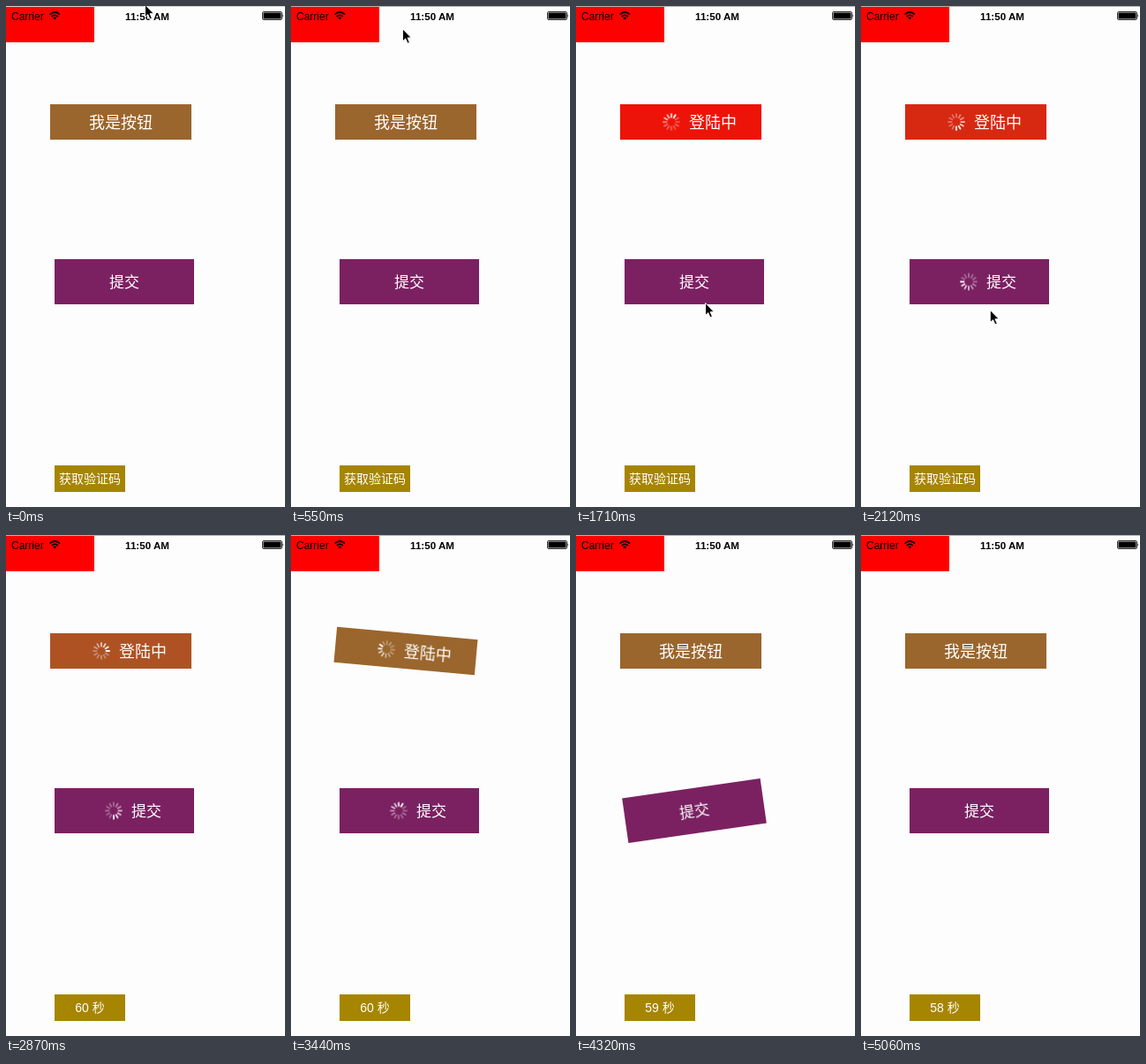
These frames come from a looping animation (316x566 px, 5.34 s). An HTML page:

```html
<!DOCTYPE html>
<html lang="zh-CN">
<head>
<meta charset="utf-8">
<title>按钮动画</title>
<style>
  html, body { margin: 0; width: 316px; height: 566px; overflow: hidden; background: #fdfdfd; }
  svg { display: block; }
  text { font-family: "Liberation Sans", "Noto Sans CJK SC", "Noto Sans CJK", sans-serif; font-weight: 300; }
  .label { fill: #fff; }
  .mid { text-anchor: middle; }

  /* Every animation shares the 5340 ms loop; negative delays shift the start. */
  .anim { animation: 5340ms linear infinite; }

  .edge { animation-name: edge; animation-timing-function: step-end; }
  @keyframes edge { 0% { fill: #d2d2d2; } .93%, 100% { fill: #b2b2b2; } }

  .login { transform-origin: 130px 131px; --load: -3970ms; --shake: -1999ms; }
  .submit { transform-origin: 134px 311.5px; --load: -3550ms; --shake: -1510ms; }

  .shake { animation-name: shake; animation-delay: var(--shake); }
  @keyframes shake {
    0%, 3.09%, 6.18%, 9.27%, 12.36%, 15.44% { transform: rotate(-9deg); }
    1.545%, 4.635%, 7.725%, 10.815%, 13.905% { transform: rotate(9deg); }
    15.45%, 100% { transform: rotate(0deg); }
  }

  .busy, .idle { animation-delay: var(--load); animation-timing-function: step-end; }
  .busy { animation-name: busy; }
  .idle { animation-name: idle; }
  @keyframes busy { 0% { visibility: visible; } 43.26%, 100% { visibility: hidden; } }
  @keyframes idle { 0% { visibility: hidden; } 43.26%, 100% { visibility: visible; } }

  .face { transform-origin: 130px 131px; animation-name: flash, pulse; animation-duration: 5340ms; }
  @keyframes flash {
    0%, 22.45% { fill: #9a662d; }
    22.46%, 25.66% { fill: #f00; }
    60.77%, 100% { fill: #9a662d; }
  }
  @keyframes pulse {
    0%, 24.16% { transform: scale(1, 1); }
    27.15% { transform: scale(1.1, 1.2); }
    29.96%, 100% { transform: scale(1, 1); }
  }

  .spin { animation-name: spin; animation-timing-function: steps(64); }
  @keyframes spin { to { transform: rotate(1920deg); } }

  .code { animation-timing-function: step-end; }
  .ask { animation-name: ask; }
  .s60 { animation-name: s60; }
  .s59 { animation-name: s59; }
  .s58 { animation-name: s58; }
  @keyframes ask { 0% { visibility: visible; } 47.75%, 100% { visibility: hidden; } }
  @keyframes s60 { 0% { visibility: hidden; } 47.75% { visibility: visible; } 73.5%, 100% { visibility: hidden; } }
  @keyframes s59 { 0% { visibility: hidden; } 73.5% { visibility: visible; } 94.75%, 100% { visibility: hidden; } }
  @keyframes s58 { 0% { visibility: hidden; } 94.75%, 100% { visibility: visible; } }

  .pointer { animation-name: travel; }
  @keyframes travel {
    0%, .94% { transform: translate(157px, -2px); }
    10.3% { transform: translate(126px, 25px); }
    15.92%, 24.16% { transform: translate(126px, 127px); }
    32.02%, 34.64% { transform: translate(146px, 335px); }
    39.7% { transform: translate(146px, 342px); }
    42.88% { transform: translate(105px, 507px); }
    45.32%, 48.3% { transform: translate(100px, 533px); }
    51.5%, 100% { transform: translate(207px, 538px); }
  }
  .arrow { animation-name: leave; animation-timing-function: step-end; }
  @keyframes leave { 0% { visibility: visible; } 52.8%, 100% { visibility: hidden; } }
  .touch { animation-name: touch; animation-timing-function: step-end; }
  @keyframes touch {
    0%, 24.16%, 33.7%, 47.4%, 100% { visibility: hidden; }
    22.46%, 32.6%, 45.7% { visibility: visible; }
  }
</style>
</head>
<body>
<svg width="316" height="566" viewBox="0 0 316 566">
  <rect class="anim edge" width="316" height="1"/>
  <rect y="1" width="100" height="40" fill="#f00"/>

  <g id="status">
    <text x="6" y="16" font-size="12">Carrier</text>
    <g fill="none" stroke="#000" stroke-width="1.7">
      <path d="M49.6 9.6Q55.3 4.4 61 9.6"/>
      <path d="M51.8 12Q55.3 8.9 58.8 12"/>
    </g>
    <path d="M53.3 13.3Q55.3 11.8 57.3 13.3L55.3 15.6Z"/>
    <text class="mid" x="160" y="16" font-size="11.6" style="font-weight:700">11:50 AM</text>
    <rect x="290.5" y="6.5" width="22" height="9" rx="1.5" fill="none" stroke="#000" stroke-width=".8"/>
    <rect x="291.5" y="7.5" width="20" height="7" rx=".6"/>
    <path d="M313.5 9.3Q315.2 11 313.5 12.7Z"/>
  </g>

  <g class="login anim shake">
    <rect class="anim face" x="50" y="111" width="160" height="40"/>
    <text class="label mid anim idle" x="130" y="137.5" font-size="18">我是按钮</text>
    <g class="anim busy">
      <g transform="translate(108 131) rotate(150)"><g class="anim spin"></g></g>
      <text class="label" x="128" y="137.5" font-size="18">登陆中</text>
    </g>
  </g>

  <g class="submit anim shake">
    <rect x="55" y="286" width="158" height="51" fill="#7b2162"/>
    <text class="label mid anim idle" x="134" y="317.7" font-size="17">提交</text>
    <g class="anim busy">
      <g transform="translate(122 311.5) rotate(240)"><g class="anim spin"></g></g>
      <text class="label" x="142" y="317.7" font-size="17">提交</text>
    </g>
  </g>

  <g class="label mid" font-size="14">
    <rect x="55" y="519" width="80" height="30" fill="#a68500"/>
    <text class="anim code ask" x="95" y="539">获取验证码</text>
    <text class="anim code s60" x="95" y="539">60 秒</text>
    <text class="anim code s59" x="95" y="539">59 秒</text>
    <text class="anim code s58" x="95" y="539">58 秒</text>
  </g>

  <g class="anim pointer">
    <g class="anim touch" fill="none">
      <circle cx="2.5" cy="1" r="9.5" stroke="#555" stroke-opacity=".5" stroke-width="2"/>
      <circle cx="2.5" cy="1" r="9.5" stroke="#fff" stroke-width="1.2"/>
    </g>
    <path class="anim arrow" d="M.5 .5V14.6L3.7 11.6 6 16.9 8.4 15.8 6.1 10.7H10.4Z" stroke="#fff" stroke-width="1"/>
  </g>
</svg>
<script>
  // Twelve spokes, fading backwards from the leading one.
  const NS = "http://www.w3.org/2000/svg";
  for (const spinner of document.querySelectorAll(".spin")) {
    for (let i = 0; i < 12; i++) {
      const spoke = document.createElementNS(NS, "path");
      spoke.setAttribute("d", "M0 -5.4V-9");
      spoke.setAttribute("stroke", "#fff");
      spoke.setAttribute("stroke-width", 1.9);
      spoke.setAttribute("stroke-linecap", "round");
      spoke.setAttribute("opacity", Math.max(0.32, 1 - i * 0.12));
      spoke.setAttribute("transform", `rotate(${-30 * i})`);
      spinner.append(spoke);
    }
  }
</script>
</body>
</html>
```
